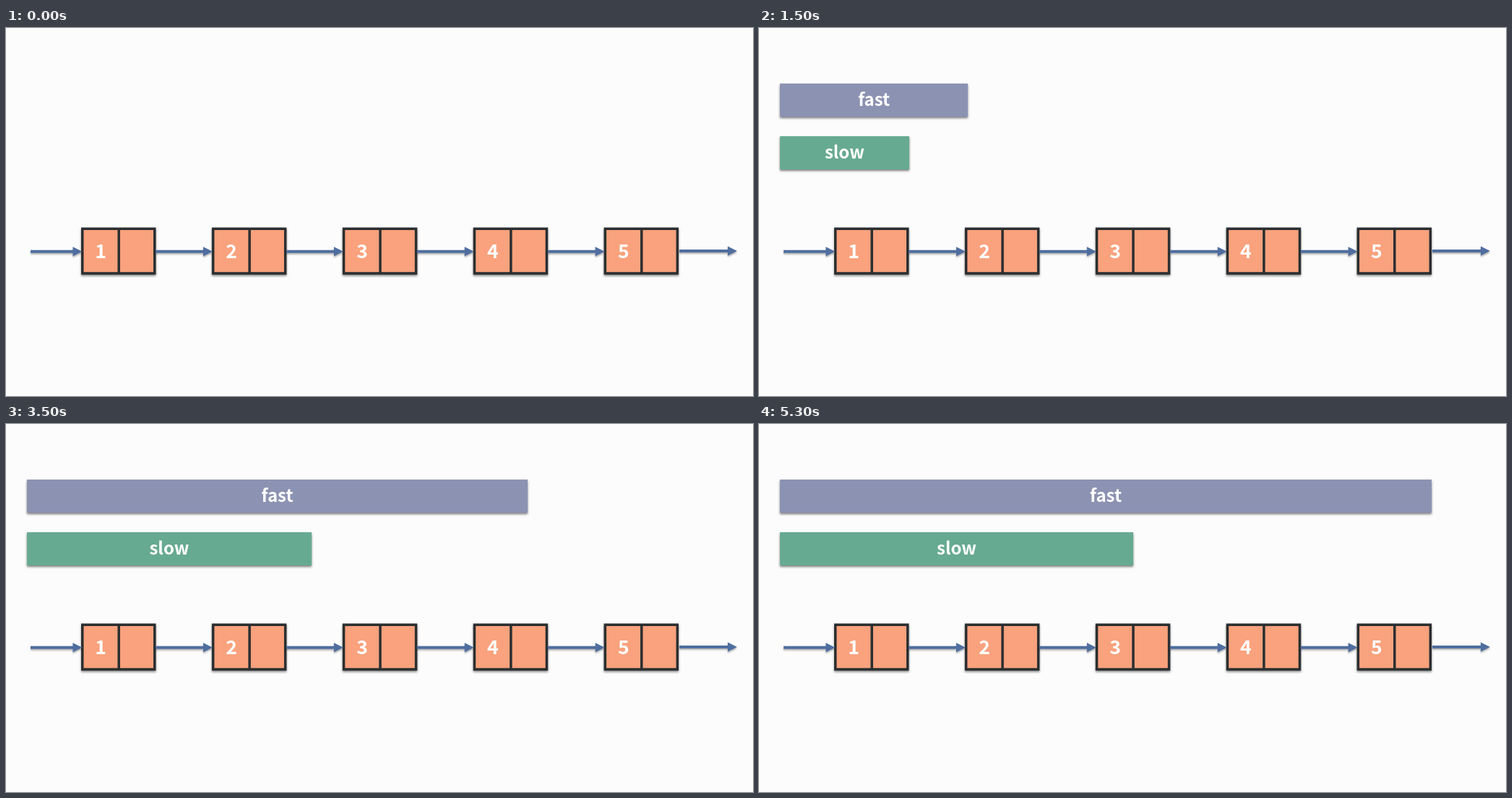
Write an HTML page that moves like this. It is 1034x510 px and loops after 5.8 s.

```html
<!DOCTYPE html>
<html lang="en">
<head>
<meta charset="utf-8">
<title>Fast and slow pointers</title>
<style>
  html, body { margin: 0; width: 100%; height: 100%; overflow: hidden; background: #fcfcfc; }
  body { position: relative; font-family: "Noto Sans CJK SC", "Noto Sans CJK JP", "Noto Sans CJK", "Noto Sans", sans-serif; font-weight: 700; }
  svg { position: absolute; left: 0; top: 0; }

  .bar {
    position: absolute; left: 29px; width: 85px; height: 45.5px;
    color: #fff; font-size: 24px; line-height: 41px; text-align: center; white-space: nowrap;
    box-shadow: 0 2px 3px rgba(0, 0, 0, .5);
    /* Paused: the script moves the playhead through a negative delay. */
    animation: appear 5800ms linear both paused, grow 5800ms linear both paused;
    animation-delay: calc(var(--time, 0) * -1ms);
  }
  .fast { top: 77px; background: #8c92b2; --middle: 489px; --end: 902px; }
  .slow { top: 150px; background: #67aa92; --middle: 301px; --end: 489px; }

  @keyframes appear {
    0% { opacity: 0; }
    7.8% { opacity: 0; animation-timing-function: ease; }
    14.5%, 100% { opacity: 1; }
  }
  @keyframes grow {
    0% { width: 85px; }
    22.09% { width: 85px; animation-timing-function: ease; }
    36.5% { width: var(--middle); }
    56.16% { width: var(--middle); animation-timing-function: ease; }
    70.57%, 100% { width: var(--end); }
  }

  .box { fill: #f9a27d; stroke: #2b2e30; stroke-width: 3.5; }
  .node { filter: drop-shadow(0 2px 1.5px rgba(0, 0, 0, .45)); }
  .arrow { fill: #4f6e9f; filter: drop-shadow(0 2px 1px rgba(0, 0, 0, .3)); }
  .digit { fill: #fff; font-size: 26.67px; text-anchor: middle; }
</style>
</head>
<body>
<div class="bar fast">fast</div>
<div class="bar slow">slow</div>
<svg id="list" width="1034" height="510" viewBox="0 0 1034 510"></svg>
<script>
  const LOOP = 5800, STEP = 100, SPACING = 180.9;

  const node = i => `
    <g transform="translate(${i * SPACING} 0)">
      <g class="node">
        <rect class="box" x="105.75" y="278.25" width="100" height="61.75"/>
        <path class="box" d="M156.2 278V340"/>
      </g>
      <text class="digit" x="131.2" y="318.7">${i + 1}</text>
    </g>`;

  const arrow = (from, to, y) => `
    <path class="arrow" d="M${from} ${y - 2}H${to - 13}V${y - 6.5}L${to} ${y}L${to - 13} ${y + 6.5}V${y + 2}H${from}Z"/>`;

  let shapes = '';
  for (let i = 0; i < 5; i++) shapes += node(i);
  shapes += arrow(34, 105.5, 309.7);
  for (let i = 0; i < 4; i++) shapes += arrow(207 + i * SPACING, 286 + i * SPACING, 309.7);
  shapes += arrow(932, 1012, 309);
  document.getElementById('list').innerHTML = shapes;

  const start = performance.now();
  function tick() {
    const elapsed = (performance.now() - start) % LOOP;
    document.body.style.setProperty('--time', Math.floor(elapsed / STEP) * STEP);
    requestAnimationFrame(tick);
  }
  tick();
</script>
</body>
</html>
```
